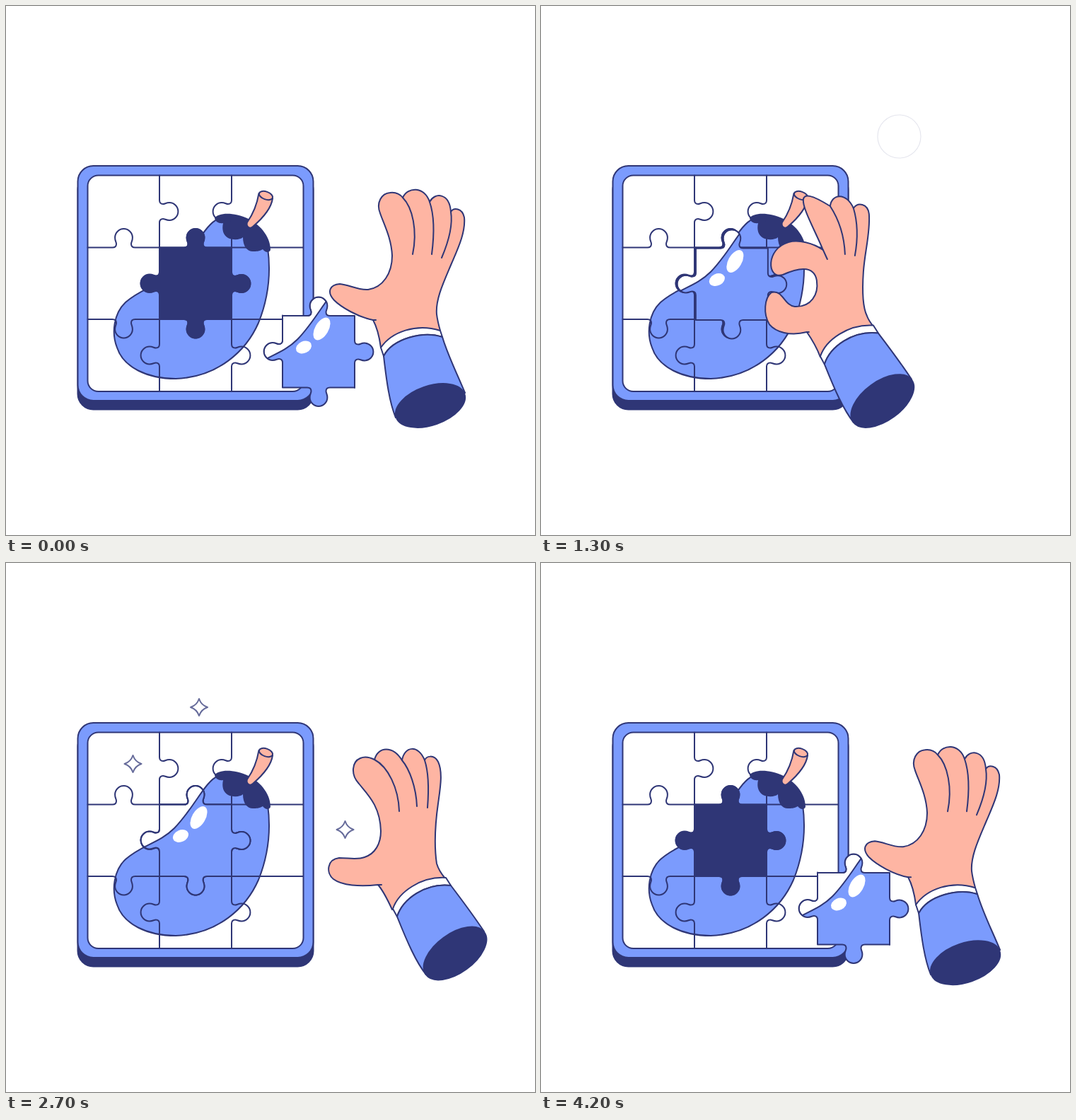
These frames come from a looping animation (748 by 748 pixels, 5700 ms). An HTML page:

```html
<!DOCTYPE html>
<html lang="en">
<head>
<meta charset="utf-8">
<title>Puzzle</title>
<style>
html, body { margin: 0; width: 100%; height: 100%; overflow: hidden; background: #fff }
svg { display: block; width: 100vw; height: 100vh; fill: none; stroke: #2f3676; stroke-width: 2; stroke-linecap: round; stroke-linejoin: round }
.blue { fill: #7b9bfd }
.dark { fill: #2f3676 }
.pink { fill: #feb5a3 }
.white { fill: #fff }
.bare { stroke: none }
</style>
</head>
<body>
<svg viewBox="0 0 748 748">
  <defs>
    <clipPath id="pieceClip"><path class="pieceShape"/></clipPath>
    <path id="body" d="M300 301C281 309 267 345 238 375C217 396 191 399 169 419C152 435 149 463 157 483C166 511 200 527 240 527C300 525 340 487 357 448C371 413 375 378 370 342C362 312 325 296 300 301Z"/>
    <path id="star" d="M0-12Q3-3 12 0Q3 3 0 12Q-3 3-12 0Q-3-3 0-12Z"/>
  </defs>

  <rect class="dark" x="101.5" y="238" width="333" height="332.5" rx="22"/>
  <rect class="blue" x="101.5" y="226" width="333" height="332" rx="22"/>
  <rect class="white" x="115.5" y="239.5" width="305" height="305.5" rx="15"/>
  <use href="#body" class="blue"/>
  <path class="dark bare" d="M295 300C300 292 322 291 343 301C362 311 374 328 374 345C372 349 367 349 363 344C358 347 354 347 349 347C341 347 335 340 335 327C331 331 320 331 314 328C307 324 305 316 307 307C301 308 296 305 295 300Z"/>
  <path id="grid"/>
  <path class="pink" d="M357.500 265C355 280 348 296 341 306C339 312 345 316 349 312C363 300 375 287 377 272"/>
  <ellipse class="pink" cx="367.500" cy="268" rx="10" ry="5.500" transform="rotate(20 367.500 268)"/>
  <path class="pieceShape dark"/>

  <g id="piece">
    <g clip-path="url(#pieceClip)">
      <path class="pieceShape white"/>
      <use href="#body" class="blue"/>
      <ellipse class="white bare" rx="9.500" ry="17.500" transform="translate(272.500 360) rotate(30)"/>
      <ellipse class="white bare" rx="11.500" ry="8.300" transform="translate(247 386) rotate(-25)"/>
    </g>
    <path class="pieceShape"/>
  </g>

  <g id="badge">
    <circle class="white" r="54.500"/>
    <path id="tick" d="M-21.500-.5L-6.500 14L21.500-13.500" stroke="#7b9bfd" stroke-width="15"/>
  </g>
  <g id="stars"></g>

  <path id="hand" class="pink"/>
  <path id="folds"/>
  <path id="cuff" class="white"/>
  <path id="sleeve" class="blue"/>
  <ellipse id="hem" class="dark" rx="51" ry="27.500"/>
</svg>
<script>
const $ = id => document.getElementById(id);
const clamp = v => Math.max(0, Math.min(1, v));

// One puzzle edge from (x, y), turned by quarter turns; flip = -1 mirrors the tab.
function edge(x, y, turns, flip = 1, start = 'M') {
  const c = [1, 0, -1, 0][turns], s = [0, 1, 0, -1][turns];
  const p = (u, v) => `${x + u * c - v * flip * s} ${y + u * s + v * flip * c} `;
  return start + p(0, 0) + 'L' + p(35, 0) + 'Q' + p(40.5, 0) + p(40.5, -5) +
    'C' + p(40.5, -8) + p(38.6, -9) + p(38.6, -14) +
    `A12.4 12.4 0 0 ${flip > 0 ? 1 : 0} ` + p(63.4, -14) +
    'C' + p(63.4, -9) + p(61.5, -8) + p(61.5, -5) +
    'Q' + p(61.5, 0) + p(67, 0) + 'L' + p(102, 0);
}

const X = [115.5, 217, 319], Y = [239.5, 341.5, 443];
const pieceD = edge(X[1], Y[1], 0) + edge(X[2], Y[1], 1, 1, 'L') +
  edge(X[2], Y[2], 2, 1, 'L') + edge(X[1], Y[2], 3, 1, 'L') + 'Z';
document.querySelectorAll('.pieceShape').forEach(e => e.setAttribute('d', pieceD));
$('grid').setAttribute('d',
  Y.map((y, i) => edge(X[1], y, 1, i ? -1 : 1) + edge(X[2], y, 1, i ? 1 : -1)).join('') +
  [0, 1].map(i => edge(X[i], Y[1], 0) + edge(X[i], Y[2], 0, -1)).join('') +
  `M319 ${Y[1]}H420M319 ${Y[2]}H420`);

const starSpots = [[273, 204], [179.5, 284], [479.5, 377]];
$('stars').innerHTML = starSpots.map(([x, y]) =>
  `<g transform="translate(${x} ${y})"><use href="#star" class="white"/></g>`).join('');
const stars = [...document.querySelectorAll('#stars use')];

// A pose lists hand, folds, cuff, sleeve and hem; all poses share the same commands.
const NUM = /-?\d+(\.\d+)?/g;
const shift = (d, dx, dy) => { let i = 0; return d.replace(NUM, n => +n + (i++ % 2 ? dy : dx)); };
const mix = (a, b, k) => {
  const to = b.match(NUM);
  let i = 0;
  return a.replace(NUM, n => +n + (to[i++] - n) * k);
};
const hem = (x, y, r) => `translate(${x} ${y}) rotate(${r})`;
const cuffD = 'M547 489C555 465 587 443 622 445L629 456C593 452 561 475 553 500Z';
const sleeveD = 'M553 500C561 475 593 452 629 456C645 477 662 500 676 521L594 582C580 565 567 535 553 500';
const arm = (dx, dy) => [shift(cuffD, dx, dy), shift(sleeveD, dx, dy), hem(635 + dx, 552 + dy, -36)];

const high = [
  'M530 483C528 468 525 455 519 444C498 440 474 426 464 416C453 404 458 394 472 393C485 394 497 402 512 401C533 398 546 378 546 353C545 328 534 308 529 293C523 278 531 265 543 264C551 263 557 266 561 271C568 255 592 255 599 277C606 263 627 264 629 291C633 285 645 285 648 299C650 320 639 343 630 364C619 390 607 415 609 436C610 444 612 452 614 459',
  'M561 271C575 285 582 318 575 351M599 277C607 300 605 328 602 351M629 291C632 310 625 335 616 356M519 444L523 444',
  'M530 483C545 461 580 448 614 459L617 468C590 459 547 470 534 495Z',
  'M534 495C547 470 590 459 617 468C625 495 638 520 649 547L551 582C542 560 538 530 534 495',
  hem(600, 565, -19)
];
const reach = [
  'M570 593C566 580 559 568 551 558C525 563 504 558 492 546C480 533 482 519 496 517C509 514 515 523 528 521C546 518 557 505 556 487C553 462 534 449 521 436C504 420 509 401 523 397C533 394 543 396 552 402C535 378 556 346 583 380C585 362 608 357 614 384C619 373 636 375 638 391C640 418 635 445 632 472C630 500 629 520 634 535C637 540 641 545 644 549',
  'M552 402C567 416 576 435 579 455M583 380C597 398 604 424 605 448M614 384C620 404 621 428 619 450M551 558L554 558',
  ...arm(23, 104)
];
const open = [
  'M546 490C540 477 533 463 526 455C500 458 475 456 463 447C452 438 454 419 471 417C485 417 497 420 507 416C522 411 530 397 530 379C529 343 511 327 499 312C487 299 489 281 501 276C508 273 515 275 521 278C526 259 547 258 560 279C563 259 583 256 592 279C594 273 605 270 611 281C618 296 614 318 611 340C606 375 606 405 609 425C611 432 616 440 621 446',
  'M521 278C540 288 555 318 556 351M560 279C571 292 580 318 581 344M592 279C597 294 598 320 596 346M526 455L531 455',
  ...arm(0, 0)
];
const pinch = [
  'M393 495C388 482 381 470 374 460C350 466 330 460 321 449C312 434 314 412 324 404C341 400 341 422 357 424C380 425 391 407 388 387C384 364 360 370 340 379C317 386 316 342 348 333C362 329 383 334 397 344C378 298 340 240 407 282C409 264 430 262 440 285C446 276 460 278 462 293C464 320 456 345 454 375C452 405 453 425 459 437C461 443 465 448 468 452',
  'M397 344C399 348 401 353 403 357M407 282C420 302 427 325 428 350M440 285C446 305 446 330 442 352M374 460L377 460',
  ...arm(-154, 5.5)
];
const REST = [174, 96.5];
const grab = [...pinch.slice(0, 2).map(d => shift(d, ...REST)), ...arm(REST[0] - 154, REST[1] + 5.5)];

const moves = [[0, high], [300, reach], [700, grab], [1000, pinch], [1600, open],
  [2700, pinch], [3300, grab], [3600, reach], [3800, high]];
const left = (t, start) => 0.22 ** (Math.max(0, t - start) / 100);

function draw(t) {
  const i = moves.findLastIndex(m => m[0] <= t);
  const [start, to] = moves[i], from = moves[Math.max(0, i - 1)][1];
  ['hand', 'folds', 'cuff', 'sleeve', 'hem'].forEach((id, j) =>
    $(id).setAttribute(id === 'hem' ? 'transform' : 'd', mix(from[j], to[j], 1 - left(t, start))));

  const away = t < 3300 ? left(t, 1000) : 1 - left(t, 3300);
  $('piece').setAttribute('transform', `translate(${REST[0] * away} ${REST[1] * away})`);

  const u = Math.max(0, t - 1200) / 100;
  const size = 1 - Math.exp(-0.65 * u) * Math.cos(0.568 * u);
  $('badge').setAttribute('transform', `translate(506.5 184.5) scale(${size})`);
  $('badge').setAttribute('opacity', clamp((t - 1275) / 200) * clamp((2600 - t) / 300));
  $('tick').setAttribute('opacity', clamp((t - 1300) / 200));

  $('stars').setAttribute('opacity', t > 1300 ? clamp((2980 - t) / 380) : 0);
  stars.forEach(s => s.setAttribute('transform', `scale(${1 - left(t, 1300)})`));
}

// The motion advances in tenths of a second.
const began = performance.now();
function tick() {
  draw(Math.floor((performance.now() - began) % 5700 / 100) * 100);
  requestAnimationFrame(tick);
}
tick();
</script>
</body>
</html>
```
